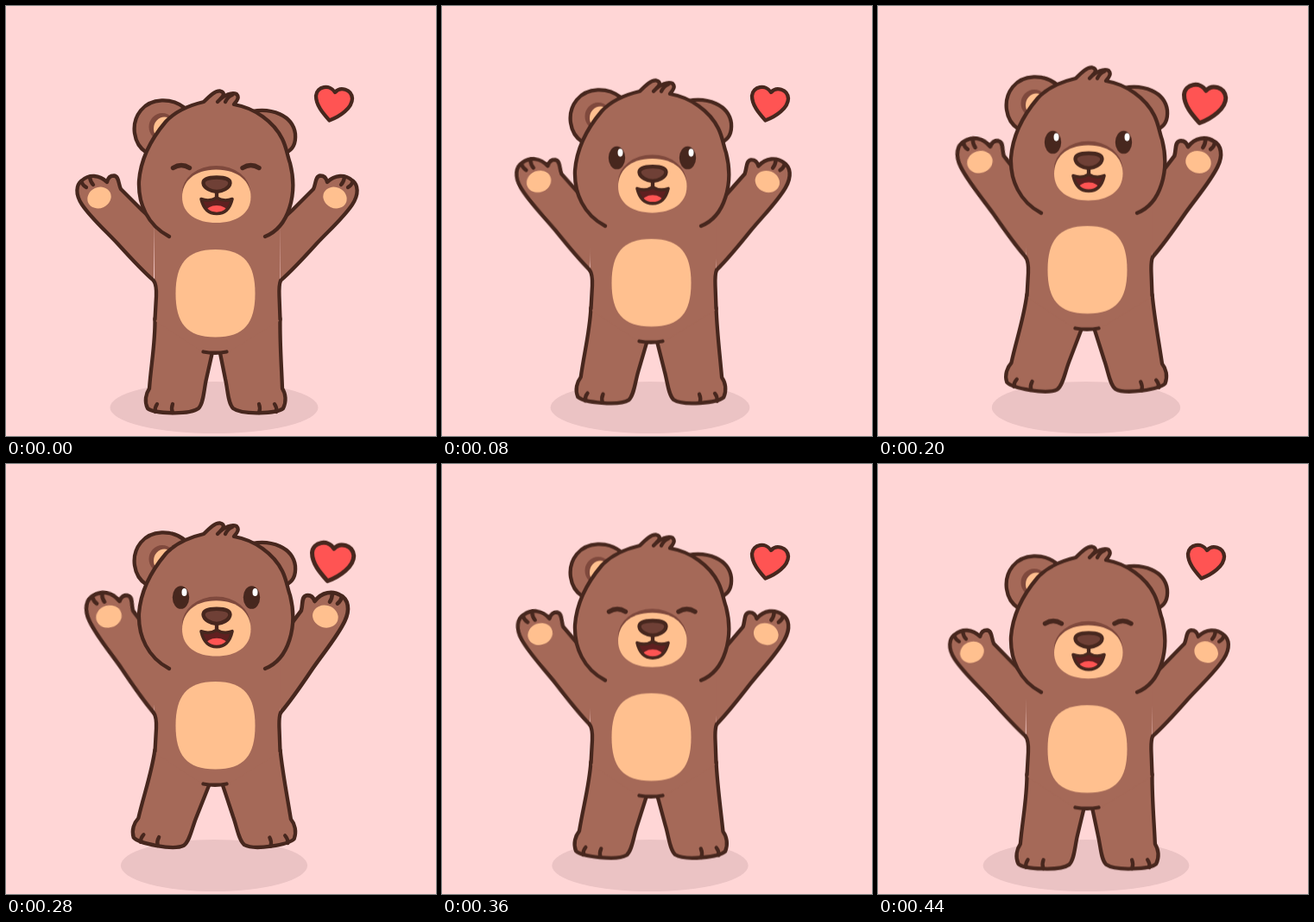
Recreate the animation shown at these times as an HTML page without scripts. Size 498 px wide and 498 px high, loop 0.48 s.

```html
<!DOCTYPE html>
<html lang="en">
<head>
<meta charset="utf-8">
<title>Jumping bear</title>
<style>
  /* --lift: 0 on the ground, 1 at the top of the jump */
  @property --lift { syntax: "<number>"; inherits: true; initial-value: 0; }

  html, body { margin: 0; width: 100%; height: 100%; overflow: hidden; background: #ffd6d6; }
  svg { display: block; width: 100vw; height: 100vh; animation: jump 480ms step-end infinite; }

  .line { stroke: #47271e; stroke-width: 4.3; stroke-linecap: round; stroke-linejoin: round; }
  .fur { fill: #a56958; }
  .peach { fill: #ffc08f; }
  .shade { fill: #7f493d; }
  .nose { fill: #6f4036; }
  .dark { fill: #47271e; }
  .none { fill: none; }

  .bear { transform: translateY(calc(var(--lift) * -30px)); }
  .shadow { fill: #ebc3c4; transform-origin: 241px 465px; transform: scaleX(calc(1 - var(--lift) * .103)); }
  .arm { transform-origin: 171px 318px; transform: rotate(calc(var(--lift) * 8.3deg)) scale(calc(1 + var(--lift) * .07)); }
  .leg.left { transform-origin: 178px 361px; transform: rotate(calc(var(--lift) * 9deg)); }
  .leg.right { transform-origin: 312px 361px; transform: rotate(calc(var(--lift) * -7deg)); }
  .muzzle { transform-origin: 244px 190px; transform: translateY(calc(var(--lift) * -1.2px)) scaleY(calc(1 + var(--lift) * .045)); }
  .eyes { transform: translateY(calc(var(--lift) * -6px)); }

  .open { animation: open 480ms step-end infinite; }
  .closed { animation: closed 480ms step-end infinite; }
  .heart { fill: #ff5453; transform-origin: 389px 113px; animation: beat 480ms step-end infinite; }

  @keyframes jump {
    0% { --lift: 0; }
    8.333% { --lift: .2; }
    16.667% { --lift: .41; }
    25% { --lift: .59; }
    33.333% { --lift: .77; }
    41.667% { --lift: .91; }
    50% { --lift: .99; }
    58.333% { --lift: 1; }
    66.667% { --lift: .82; }
    75% { --lift: .55; }
    83.333% { --lift: .29; }
    91.667% { --lift: .09; }
    100% { --lift: 0; }
  }
  @keyframes open {
    0%, 66.667%, 100% { visibility: hidden; }
    16.667% { visibility: visible; }
  }
  @keyframes closed {
    0%, 66.667%, 100% { visibility: visible; }
    16.667% { visibility: hidden; }
  }
  @keyframes beat {
    0%, 66.667%, 100% { transform: none; }
    33.333% { transform: scale(1.15); }
  }
</style>
</head>
<body>
<svg viewBox="0 0 498 498">
  <defs>
    <g id="arm">
      <g class="arm">
        <path class="fur line" d="M171 318C163 311 149 297 130 276C113 258 98 245 88 230C80 218 81 207 88 202C96 195 108 195 117 204C118 199 121 196.500 125 196.500C131 197 130 206 133 212L158 237L172 250"/>
        <path class="line none" d="M87 203Q89 208 93 210M97 198.500Q98 204 101 207"/>
        <ellipse class="peach" cx="108" cy="222" rx="14" ry="12" transform="rotate(-25 108 222)"/>
      </g>
    </g>
    <g id="eye">
      <ellipse class="dark" cx="202.500" cy="190.500" rx="9.700" ry="13.300"/>
      <ellipse cx="206.500" cy="184.500" rx="3" ry="4.600" fill="#fff"/>
    </g>
    <path id="lid" d="M193.500 187.500Q203 181.500 212.500 187.500"/>
    <path id="mouth" d="M226 223.500Q236 227 244 222Q252 227 262 223.500Q258 240.500 244 240.500Q230 240.500 226 223.500Z"/>
    <clipPath id="lips"><use href="#mouth"/></clipPath>
  </defs>

  <ellipse class="shadow" cx="241" cy="465" rx="120.500" ry="30"/>

  <path class="heart line" d="M374.500 132.500C367 124 359 115 359 104C360 93 375 90 381 100C387 93 400 96 401 107C401 118 387 128 374.500 132.500Z"/>

  <g class="bear">
    <g class="leg left">
      <path class="fur line" d="M172.500 362C173 390 168 415 166 443C162 449 160 458 164 466C171 472 212 474 223 466C229 460 229 445 232 432L241 392"/>
      <path class="line none" d="M175 461Q172 465 173 470M193 461Q191 466 193 471"/>
    </g>
    <g class="leg right">
      <path class="fur line" d="M317.500 362C317 390 319 415 320 443C324 449 325 458 321 466C314 472 274 474 263 466C257 460 257 445 254 432L246 392"/>
      <path class="line none" d="M311 461Q314 465 313 470M293 461Q295 466 293 471"/>
    </g>
    <use href="#arm"/>
    <use href="#arm" transform="matrix(-1 0 0 1 489 0)"/>

    <path class="fur" d="M172 250V364L228 401H257L317.500 364V250Z"/>
    <path class="line none" d="M171 318Q174.500 323 174 336L172.500 363M318 318Q316 323 316.500 336L317.500 363M228.500 400.500Q242 403 255.500 400.500"/>
    <path class="peach" d="M242.500 282C276 282 288.500 299 288.500 333C288.500 367 276 383.500 242.500 383.500C209 383.500 196.500 367 196.500 333C196.500 299 209 282 242.500 282Z"/>

    <!-- ears -->
    <path class="fur line" d="M163 170C147 160 144 136 156 121C168 106 192 106 207 118Z"/>
    <ellipse class="shade" cx="181" cy="140" rx="15.500" ry="16"/>
    <ellipse class="peach" cx="183.500" cy="142" rx="12.500" ry="13.500"/>
    <path class="fur line" d="M285 122C307 118 332 126 335 148C336 160 331 167 324 170Z"/>

    <!-- head and tuft -->
    <path class="fur line" d="M189 267C164 254 153 229 154 203C156 176 168 154 185 134C197 121 212 115 229 111C236 104 242 98 248 98.500C254 100 252 104 249 107C256 102 262 99.500 267 102C271 106 267 110 264 114C288 118 310 134 320 154C325 164 326 174 329 182C338 217 328 256 300 267"/>
    <path class="line none" d="M249 107L245 111M262 103Q257 105 254 111"/>

    <!-- face -->
    <g class="muzzle">
      <ellipse class="shade" cx="243.500" cy="216" rx="39.500" ry="31"/>
      <path class="peach" d="M243.500 189.500C270 189.500 283.500 204 283.500 221C283.500 241 266 251 243.500 251C221 251 204 241 204 221C204 204 217 189.500 243.500 189.500Z"/>
      <path class="line none" d="M244 214V222"/>
      <use href="#mouth" fill="#5f2020"/>
      <ellipse cx="244" cy="239" rx="12.500" ry="8" fill="#ff5453" clip-path="url(#lips)"/>
      <use href="#mouth" class="line none" style="stroke-width:3.6"/>
      <path class="nose line" d="M244 198.500C254 198.500 259.500 201 259.500 205C259 211 250 215 244 215C238 215 229 211 228.500 205C228.500 201 234 198.500 244 198.500Z"/>
    </g>
    <g class="eyes">
      <g class="open">
        <use href="#eye"/>
        <use href="#eye" x="82"/>
      </g>
    </g>
    <g class="closed line none" style="stroke-width:5.4">
      <use href="#lid"/>
      <use href="#lid" x="80.500"/>
    </g>
  </g>
</svg>
</body>
</html>
```
